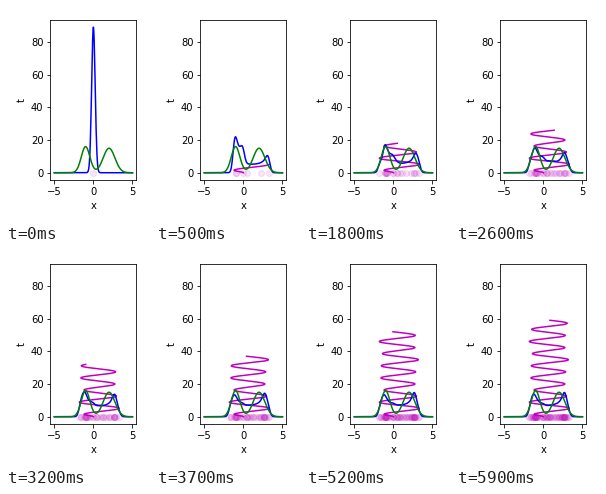
Animation, 144 px wide and 216 px high, one loop 6 s. Source, as a matplotlib script:

```python
import matplotlib.pyplot as plt
import numpy as np
from matplotlib.animation import FuncAnimation

FRAMES, INTERVAL = 60, 100
STEPS = 20            # path samples per unit of time
WIDTH = 0.224         # kernel width of the density estimate
AREA = 50.0
FIRST_TURN, HALF_PERIOD = 1.45, 3.715

plt.rcParams.update({"font.family": "DejaVu Sans", "font.size": 10})

# The path swings between these turning points, at a steady pace.
TURNS = [0, -1.2, 3.3, -1.8, 2.95, -1.2, 2.75, -1.6, 2.85,
         -1.55, 3.2, -1.4, 2.75, -1.8, 2.8, -1.5, 3.05, -1.5]
TURN_TIMES = np.r_[0, FIRST_TURN + HALF_PERIOD * np.arange(len(TURNS) - 1)]


def position(t):
    k = np.clip(np.searchsorted(TURN_TIMES, t, side="right") - 1,
                0, len(TURNS) - 2)
    a, b = np.take(TURNS, k), np.take(TURNS, k + 1)
    u = (t - TURN_TIMES[k]) / (TURN_TIMES[k + 1] - TURN_TIMES[k])
    return a + (b - a) * (1 - np.cos(np.pi * u)) / 2


def bell(x, centre, width):
    return np.exp(-0.5 * ((x - centre) / width) ** 2)


def density(samples):
    height = AREA / (WIDTH * np.sqrt(2 * np.pi))
    return height * bell(grid[:, None], samples, WIDTH).mean(axis=1)


grid = np.linspace(-5, 5, 201)
times = np.arange((FRAMES - 1) * STEPS + 1) / STEPS
path = position(times)

fig = plt.figure(figsize=(2, 3), dpi=72)
ax = fig.add_axes([44.4 / 144, 42 / 216, 86 / 144, 160 / 216])
ax.set(xlim=(-5.5, 5.5), ylim=(-4.45, 93.45), xlabel="x", ylabel="t",
       xticks=[-5, 0, 5], yticks=[0, 20, 40, 60, 80])

dots, = ax.plot([], [], "mo", alpha=0.1)
trail, = ax.plot([], [], "m")
estimate, = ax.plot([], [], "b")
ax.plot(grid, 16 * bell(grid, -1, 0.55) + 15 * bell(grid, 2, 0.75), "g")


def draw(frame):
    n = frame * STEPS + 1
    visited = path[:n:STEPS]
    dots.set_data(visited, np.zeros_like(visited))
    trail.set_data(path[:n], times[:n])
    estimate.set_data(grid, density(path[:n]))
    return dots, trail, estimate


anim = FuncAnimation(fig, draw, frames=FRAMES, interval=INTERVAL, repeat=True)
plt.show()
```
